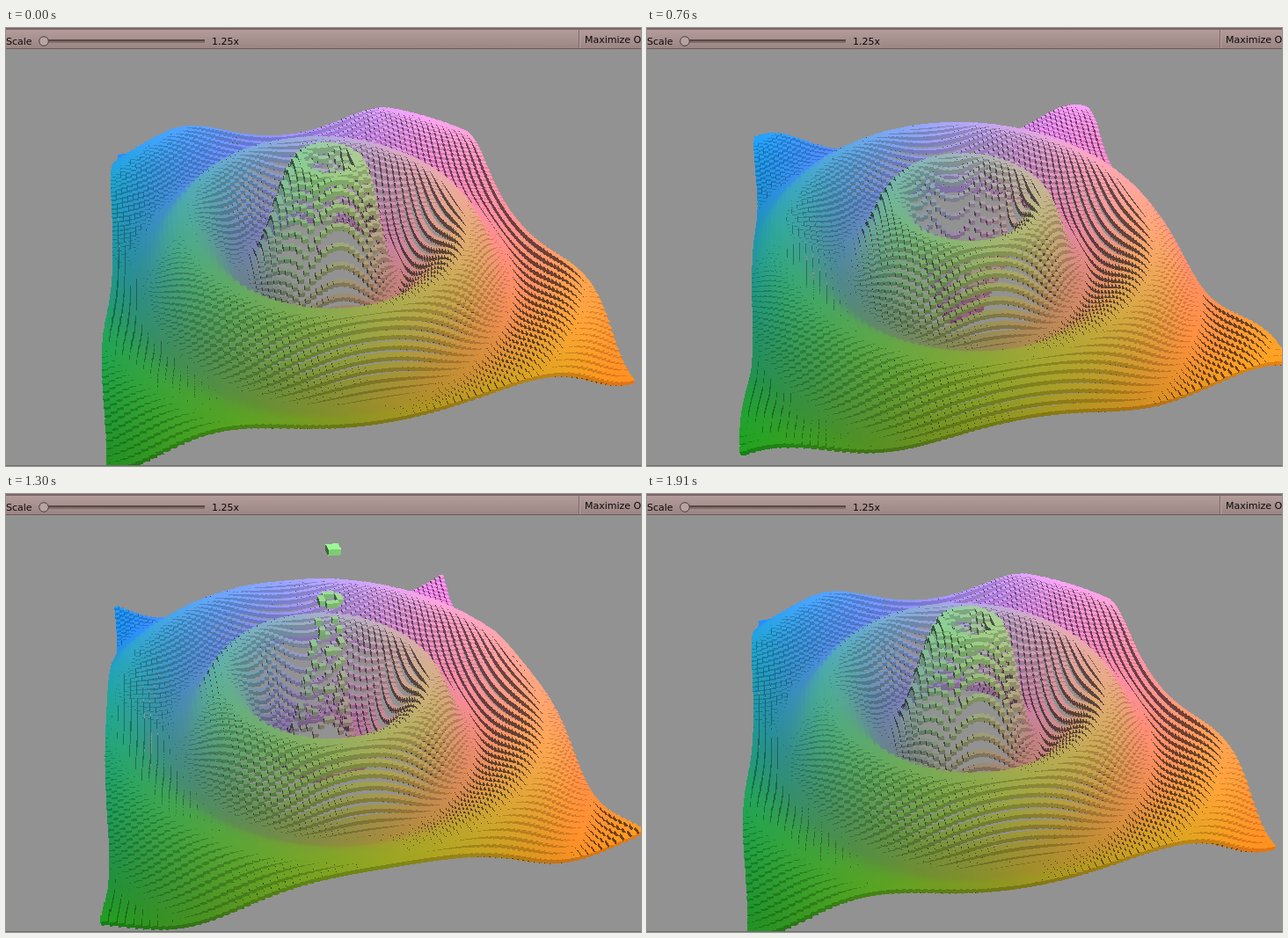
Animation, 722 px wide and 498 px high, one loop 1.99 s. Source, as an HTML page with a canvas:

```html
<!DOCTYPE html>
<html lang="en">
<head>
<meta charset="utf-8">
<title>Ripple graph</title>
<style>
html, body { margin: 0; width: 100%; height: 100%; overflow: hidden; background: #929292; }
canvas { display: block; }
</style>
</head>
<body>
<canvas id="stage" width="722" height="498"></canvas>
<script>
const W = 722, H = 498, TOP = 24, BOTTOM = 497;
const LOOP = 1990, STEPS = 26;
const RES = 80, S = 2 / RES;
const ctx = document.getElementById('stage').getContext('2d');
const { sin, cos, PI, sqrt, ceil, floor, min, max } = Math;

// Camera
const FOCAL = 666, CX = 315, CY = 262;
const PITCH = 0.745, YAW = 0.1855;
const OX = 0.1956, OY = 0.1088, DIST = 2.818;
const EYE_X = -0.587;
const sp = sin(PITCH), cp = cos(PITCH), sy = sin(YAW), cy = cos(YAW);

function project(x, y, z) {
  const u = x * cy - z * sy, v = x * sy + z * cy;
  const k = FOCAL / (DIST + v * cp - y * sp);
  return [CX + (OX + u) * k, CY - (OY + v * sp + y * cp) * k];
}

// Each shade: colour factors and a constant sheen
const TOP_FACE = [0.96, 0.95, 0.91, 0.13];
const FRONT_FACE = [0.83, 0.81, 0.76, 0.08];
const RIGHT_FACE = [0.68, 0.67, 0.66, 0.08];
const LEFT_FACE = [0.36, 0.34, 0.36, 0.08];

const image = ctx.createImageData(W, H);
const pixels = new Uint32Array(image.data.buffer);
const pack = (r, g, b) => (255 << 24 | b << 16 | g << 8 | r) >>> 0;
const BACK = pack(146, 146, 146);

function tint(rgb, shade) {
  const [r, g, b] = rgb.map((c, i) => min(255, (c * shade[i] + shade[3]) * 255));
  return pack(r, g, b);
}

// Hard-edged convex polygon
function fill(pts, color) {
  let y0 = Infinity, y1 = -Infinity;
  for (const p of pts) { y0 = min(y0, p[1]); y1 = max(y1, p[1]); }
  const a = max(TOP, ceil(y0 - 0.5)), b = min(BOTTOM, ceil(y1 - 0.5));
  for (let y = a; y < b; y++) {
    const yc = y + 0.5;
    let l = Infinity, r = -Infinity;
    for (let i = 0; i < pts.length; i++) {
      const p = pts[i], q = pts[(i + 1) % pts.length];
      if ((p[1] <= yc) === (q[1] <= yc)) continue;
      const x = p[0] + (yc - p[1]) / (q[1] - p[1]) * (q[0] - p[0]);
      l = min(l, x); r = max(r, x);
    }
    const x0 = max(0, ceil(l - 0.5)), x1 = min(W, ceil(r - 0.5));
    if (x1 > x0) pixels.fill(color, y * W + x0, y * W + x1);
  }
}

const at = i => (i + 0.5) * S - 1;

function cube(i, j, time) {
  const x = at(i), z = at(j), h = S / 2;
  const d = sqrt(x * x + z * z);
  const y = sin(PI * (4 * d - time)) / (1 + 10 * d);
  const rgb = [x, y, z].map(c => max(0, c * 0.5 + 0.5));
  const v = (a, b, c) => project(x + a * h, y + b * h, z + c * h);
  const flt = v(-1, 1, -1), frt = v(1, 1, -1), blt = v(-1, 1, 1), brt = v(1, 1, 1);
  const flb = v(-1, -1, -1), frb = v(1, -1, -1);
  if (x > EYE_X) fill([flt, blt, v(-1, -1, 1), flb], tint(rgb, LEFT_FACE));
  else fill([frt, brt, v(1, -1, 1), frb], tint(rgb, RIGHT_FACE));
  fill([flt, frt, frb, flb], tint(rgb, FRONT_FACE));
  fill([flt, frt, brt, blt], tint(rgb, TOP_FACE));
}

// The wave runs evenly except for a short step every seventh time
const LAG = 0.58;
const wait = step => step - LAG * floor((step + 2) / 7);
const waveTime = step => 0.104 + 2 * wait(step) / wait(STEPS);

function drawGraph(step) {
  const time = waveTime(step);
  pixels.fill(BACK);
  const split = Math.round((EYE_X + 1) / S);
  for (let j = RES - 1; j >= 0; j--) {
    for (let i = 0; i < split; i++) cube(i, j, time);
    for (let i = RES - 1; i >= split; i--) cube(i, j, time);
  }
}

function bar(x, y, w, h, color) {
  ctx.fillStyle = color;
  ctx.fillRect(x, y, w, h);
}

function drawToolbar() {
  const g = ctx.createLinearGradient(0, 2, 0, 23);
  g.addColorStop(0, '#b39c9a');
  g.addColorStop(1, '#9c8684');
  bar(0, 0, W, TOP, g);
  bar(0, 0, W, 2, '#7c6665');
  bar(0, 23, W, 1, '#6e5b5a');
  bar(651, 2, 1, 21, '#7b6766');
  bar(652, 2, 1, 21, '#b9a4a2');
  bar(46, 13, 180, 4, '#806d6c');
  bar(46, 13, 180, 2, '#584948');
  ctx.beginPath();
  ctx.arc(43, 15, 5.3, 0, 2 * PI);
  ctx.fillStyle = '#b7a3a1';
  ctx.fill();
  ctx.strokeStyle = '#4c3f3e';
  ctx.stroke();
  ctx.font = '11px "DejaVu Sans", sans-serif';
  ctx.fillStyle = '#0c0909';
  ctx.fillText('Scale', 0, 19);
  ctx.fillText('1.25x', 234, 19);
  ctx.fillText('Maximize On Play', 658, 17);
  bar(0, BOTTOM, W, 1, '#6c6c6c');
}

let shown = -1;
function frame() {
  const t = performance.now() % LOOP;
  const step = floor((t + 7) / LOOP * STEPS) % STEPS;
  if (step !== shown) {
    shown = step;
    drawGraph(step);
    ctx.putImageData(image, 0, 0);
    drawToolbar();
  }
  requestAnimationFrame(frame);
}
frame();
</script>
</body>
</html>
```
